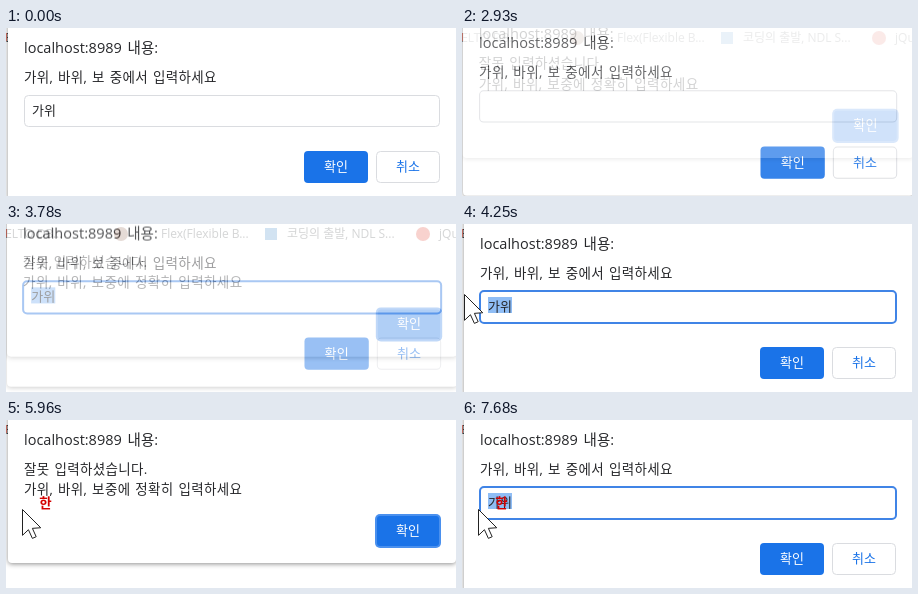
An HTML page with a canvas that plays this animation: 450x168 px, repeating every 8000 ms.

```html
<!DOCTYPE html>
<html lang="ko">
<head>
<meta charset="utf-8">
<title>Prompt dialog</title>
<style>
  html, body { margin: 0; width: 100%; height: 100%; overflow: hidden; background: #fff; }
  canvas { display: block; width: 450px; height: 168px; }
</style>
</head>
<body>
<canvas id="stage"></canvas>
<script>
const W = 450, H = 168, LOOP = 8000;
const BLUE = '#1a73e8', INK = '#26272a', LINE = '#dadce0';
const FONT = '"Open Sans", "Noto Sans CJK KR", "Noto Sans CJK", sans-serif';
const dpr = window.devicePixelRatio || 1;

// Moments at which one dialog replaces the other, starting with the alert.
const SWAPS = [[2930, 3090], [3710, 3940], [5730, 5960], [7520, 7680]];

const stage = document.getElementById('stage');
const layer = document.createElement('canvas');
for (const c of [stage, layer]) {
  c.width = W * dpr;
  c.height = H * dpr;
}
const out = stage.getContext('2d');
const pad = layer.getContext('2d');

const within = (t, a, b) => t >= a && t < b;
const mix = (a, b, p) => a + (b - a) * p;

// Progress from 0 to 1, advancing in steps like a screen recording.
const stepped = (t, a, b, step) =>
  t >= b ? 1 : Math.min(1, Math.floor((t - a) / step) * step / (b - a));

function text(g, str, x, y, size, { color = INK, weight = 400, align = 'left', gap = 0, word = 0 } = {}) {
  g.font = `${weight} ${size}px ${FONT}`;
  g.letterSpacing = gap + 'px';
  g.wordSpacing = word + 'px';
  g.fillStyle = color;
  g.textAlign = align;
  g.fillText(str, x, y);
}

const label = (g, str, y) => text(g, str, 18, y, 13.5, { gap: .35, word: 1 });

function box(g, x, y, w, h, r, fill, stroke, width = 1) {
  g.beginPath();
  g.roundRect(x, y, w, h, r);
  if (fill) { g.fillStyle = fill; g.fill(); }
  if (stroke) { g.strokeStyle = stroke; g.lineWidth = width; g.stroke(); }
}

function dot(g, x, y, r, color) {
  g.fillStyle = color;
  g.beginPath();
  g.arc(x, y, r, 0, 7);
  g.fill();
}

function page(g) {
  g.fillStyle = '#fff';
  g.fillRect(0, 0, W, H);
  const tab = (str, x) => text(g, str, x, 14, 12, { color: '#3c4043' });
  tab('VELTO DB...', -8);
  dot(g, 115, 10, 7, '#8a5a44');
  tab('Flex(Flexible B...', 155);
  g.fillStyle = '#2f80c8';
  g.fillRect(259, 4, 12, 12);
  tab('코딩의 출발, NDL S...', 281);
  dot(g, 417, 10, 7, '#e0301c');
  tab('jQuery', 433);
  g.fillStyle = '#d9776a';
  g.fillRect(0, 5, 1, 8);
}

function panel(g, bottom) {
  g.save();
  g.shadowColor = 'rgba(0,0,0,.45)';
  g.shadowBlur = 5 * dpr;
  g.shadowOffsetY = dpr;
  box(g, 2, -40, 448, bottom + 40, 4, '#fff');
  g.restore();
  text(g, 'localhost:8989 내용:', 18, 25, 14.5, { word: 2 });
}

function field(g, t) {
  const focused = within(t, 750, 2930) || within(t, 3710, 5730) || t >= 7520;
  const empty = within(t, 2070, 3710) || within(t, 5410, 7520);
  const caret = within(t, 2070, 2620) || within(t, 5410, 5730);
  if (focused) box(g, 18, 67, 416, 32, 4, '#fff', '#4084e6', 2);
  else box(g, 18.5, 67.5, 415, 31, 4, '#fff', LINE);
  if (!empty) {
    if (focused) {
      const from = t < 1140 ? Math.min(50, Math.max(26, pointer(t).x)) : 26;
      g.fillStyle = '#8fbdf5';
      g.fillRect(from, 73, 50 - from, 16);
    }
    text(g, '가위', 26, 87, 13);
  }
  if (caret) {
    g.fillStyle = '#000';
    g.fillRect(26, 73, 1, 16);
  }
}

function prompt(g, t) {
  panel(g, 172);
  label(g, '가위, 바위, 보 중에서 입력하세요', 54);
  field(g, t);
  box(g, 298, 123, 64, 32, 4, BLUE);
  text(g, '확인', 330, 143, 13, { color: '#fff', weight: 500, align: 'center' });
  box(g, 370.5, 123.5, 63, 31, 4, '#fff', LINE);
  text(g, '취소', 402, 143, 13, { color: BLUE, align: 'center' });
}

function alertBox(g) {
  panel(g, 143);
  label(g, '잘못 입력하셨습니다.', 53.5);
  label(g, '가위, 바위, 보중에 정확히 입력하세요', 74);
  box(g, 369, 94, 66, 34, 5, '#4a90ee');
  box(g, 371, 96, 62, 30, 3, BLUE);
  text(g, '확인', 402, 115, 13, { color: '#fff', weight: 500, align: 'center' });
}

// A dialog fades as one piece, lifted and slightly enlarged.
function show(draw, t, alpha, lift, grow) {
  const scale = 1 + grow;
  pad.setTransform(1, 0, 0, 1, 0, 0);
  pad.clearRect(0, 0, layer.width, layer.height);
  pad.setTransform(dpr * scale, 0, 0, dpr * scale, -dpr * 200 * grow, -dpr * lift);
  draw(pad, t);
  out.globalAlpha = alpha;
  out.drawImage(layer, 0, 0, W, H);
  out.globalAlpha = 1;
}

function dialogs(t) {
  const count = SWAPS.filter(s => t >= s[0]).length;
  const [next, prev] = count % 2 ? [alertBox, prompt] : [prompt, alertBox];
  const p = count ? stepped(t, ...SWAPS[count - 1], 70) : 1;
  if (p < 1) show(prev, t, .88 * (1 - p), 5 + 20 * p, .005);
  show(next, t, mix(.2, 1, p), Math.round(14 * (1 - p)), .007 * (1 - p));
}

// Sweeps in from below and out to the left, later returns and rests by the field.
function pointer(t) {
  if (within(t, 450, 1140)) {
    const p = stepped(t, 450, 1140, 77);
    return { x: mix(-12, 192, (1 - p) ** 1.5), y: 82 + 68 * (1 - p) ** 5 };
  }
  if (t >= 4710) return { x: 16, y: 89 };
  if (t >= 4250) {
    const p = stepped(t, 4250, 4390, 70);
    return { x: mix(2, 8, p) + 15 * Math.sin(Math.PI * p), y: mix(70, 89, p) };
  }
  return null;
}

function arrow(g, x, y) {
  const pts = [[0, 0], [0, 17], [3.9, 13.3], [6.5, 19], [9, 17.9], [6.5, 12.4], [12, 12]];
  g.beginPath();
  for (const [px, py] of pts) g.lineTo(x + .5 + px * 1.52, y + .5 + py * 1.52);
  g.closePath();
  g.fillStyle = '#fff';
  g.fill();
  g.strokeStyle = '#222';
  g.lineWidth = 1;
  g.stroke();
}

function beam(g, x, y) {
  g.fillStyle = '#222';
  g.fillRect(x, y - 10, 1, 20);
  g.fillRect(x - 3, y - 11, 7, 1);
  g.fillRect(x - 3, y + 10, 7, 1);
}

function render(t) {
  out.setTransform(dpr, 0, 0, dpr, 0, 0);
  page(out);
  dialogs(t);
  if (t >= 4710) text(out, '한', 39.5, 88, 13.5, { color: '#d40000', weight: 700, align: 'center' });
  const at = pointer(t);
  if (at) {
    const overField = at.x > 18 && within(at.y, 67, 99);
    (overField ? beam : arrow)(out, Math.round(at.x), Math.round(at.y));
  }
}

const start = performance.now();
function tick() {
  render((performance.now() - start) % LOOP);
  requestAnimationFrame(tick);
}
tick();
</script>
</body>
</html>
```
